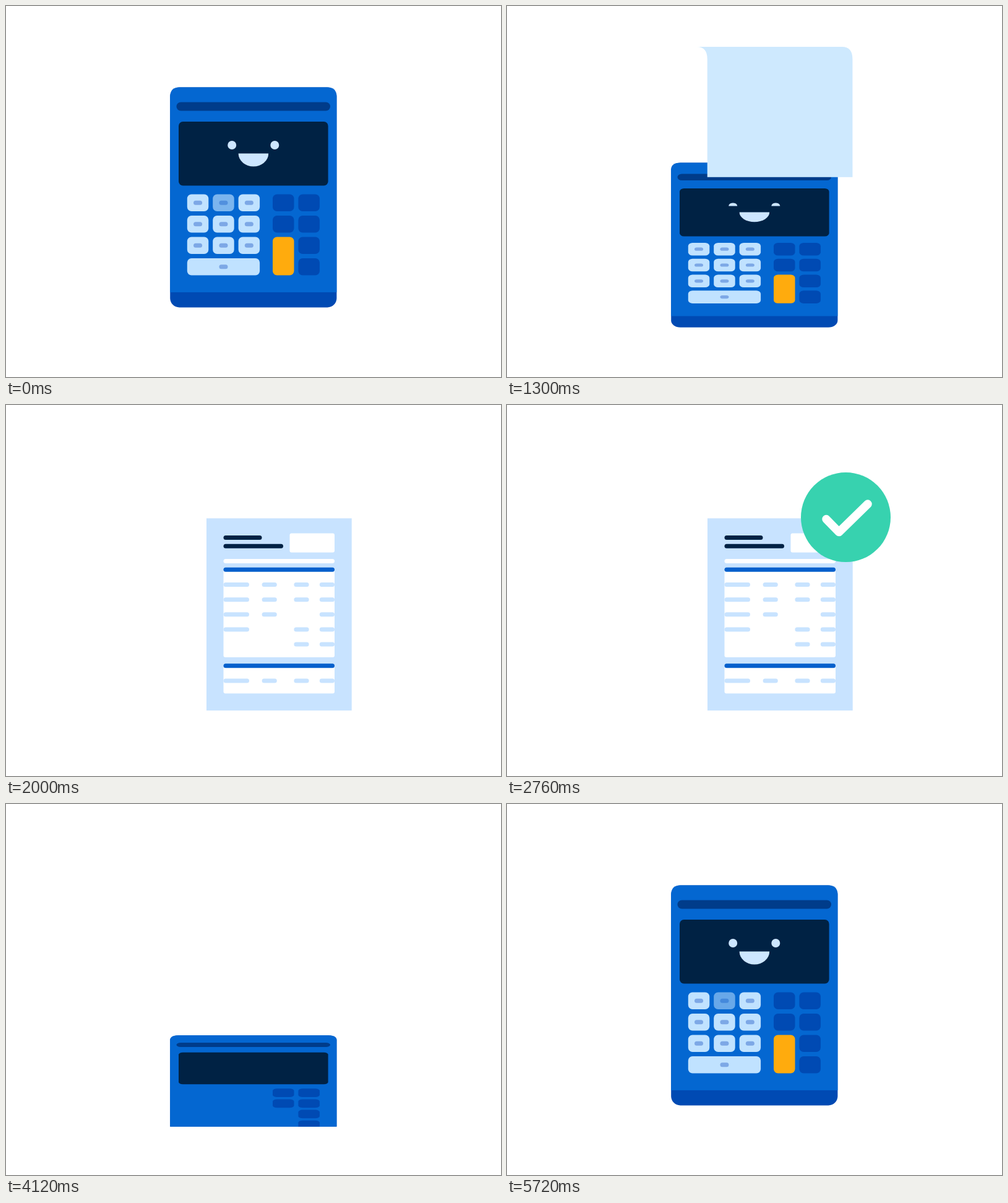
Recreate the animation shown at these times as an HTML page. Size 800 by 600 pixels, loop 5740 ms.

```html
<!DOCTYPE html>
<html lang="en">
<head>
<meta charset="utf-8">
<title>Calculator prints a sheet</title>
<style>
  html, body { margin: 0; width: 100%; height: 100%; overflow: hidden; background: #fff; }
  svg { display: block; }
</style>
</head>
<body>
<svg id="stage" width="800" height="600" viewBox="0 0 800 600"></svg>
<script>
const LOOP = 5740, FLOOR = 615;
const BODY = '#0467d1', DEEP = '#004ab3', NAVY = '#002244', PALE = '#c8e3ff', KEY = '#c0e2ff';

const rect = (x, y, w, h, r, fill) =>
  `<rect x="${x}" y="${y}" width="${w}" height="${h}" rx="${r}" fill="${fill}"/>`;
const dash = (x, y) => rect(x - 7, y - 3.5, 14, 7, 3.5, '#7da8e6');
const group = (cls, inner) => `<g class="${cls}">${inner}</g>`;

const columns = [292.8, 334.2, 375.6], rows = [304.5, 339, 373.5, 408];
const pops = [];   // centre of every key that pops in

function lightKeys() {
  let out = '';
  for (let i = 0; i < 10; i++) {
    const wide = i === 9, x = wide ? columns[0] : columns[i % 3], y = rows[wide ? 3 : Math.floor(i / 3)];
    const w = wide ? 117.3 : 34.5;
    pops.push([x + w / 2, y + 13.8]);
    out += group('key', rect(x, y, w, 27.6, 7, KEY) + dash(x + w / 2, y + 13.8));
  }
  pops.push([448.2, 404.5]);
  return out + group('key', rect(431, 373.5, 34.5, 62, 7, '#ffab0d'));
}

function calculator() {
  let out = rect(265.2, 131.5, 269.2, 356, 15, DEEP)
    + `<path d="M265.2 463V146.5q0-15 15-15H519.4q15 0 15 15V463z" fill="${BODY}"/>`
    + rect(275.5, 155.5, 248.5, 14, 7, '#003c8a')
    + rect(279, 187, 241.6, 103.5, 7, NAVY);
  rows.forEach((y, i) => {
    if (i < 2) out += rect(431, y, 34.5, 27.6, 7, DEEP);
    out += rect(472.4, y, 34.5, 27.6, 7, DEEP);
  });
  return out + group('face',
    `<g clip-path="url(#lids)" fill="#cde6ff"><circle cx="365.2" cy="225" r="7"/><circle cx="434.3" cy="225" r="7"/></g>
     <path d="M375.6 238.5h48.6a24.3 21 0 0 1-48.6 0z" fill="#cde6ff"/>`) + lightKeys();
}

function sheet() {
  const cells = [[351.5, 41.5], [413.6, 24.2], [465.4, 24.2], [506.8, 24.2]];
  const line = (y, mask) => cells.map(([x, w], i) => mask[i] === '1' ? rect(x, y, w, 7, 3.5, PALE) : '').join('');
  const bar = (y, w, fill) => rect(351.5, y, w, 7, 3.5, fill);
  return rect(324, 183.3, 234.7, 310.8, 0, PALE)
    + bar(211, 62, NAVY) + bar(224.8, 96.5, NAVY)
    + rect(458.5, 207.5, 72.5, 31, 3, '#fff') + bar(249, 179.5, '#fff')
    + rect(351.5, 266, 179.5, 142, 3, '#fff') + bar(262.8, 179.5, '#0560cc')
    + ['1111', '1111', '1101', '1011', '0011'].map((m, i) => line(287 + i * 24.15, m)).join('')
    + rect(351.5, 422, 179.5, 44.5, 3, '#fff') + bar(418.3, 179.5, '#0560cc') + line(442.4, '1111');
}

const stage = document.getElementById('stage');
stage.innerHTML = `
  <clipPath id="floor"><rect width="800" height="521.8"/></clipPath>
  <clipPath id="lids"><rect id="lid" x="350" y="218" width="100" height="14"/></clipPath>
  <g clip-path="url(#floor)">
    <g id="calc">${calculator()}</g>
    <path id="paper"/>
    <g id="sheet">${sheet()}</g>
  </g>
  <g id="check"><circle r="72.5" fill="#37d2af"/>
    <path d="M-31.5 3L-11 24L35.5-21.5" fill="none" stroke="#fff" stroke-width="13.5"
      stroke-linecap="round" stroke-linejoin="round" pathLength="100" stroke-dasharray="100 200"/></g>`;

const find = s => stage.querySelector(s);
const [calc, paper, doc, check, lid, face] = ['#calc', '#paper', '#sheet', '#check', '#lid', '.face'].map(find);
const tick = find('#check path'), keys = [...stage.querySelectorAll('.key')];

const mix = (a, b, p) => a + (b - a) * p;
const span = (t, a, b) => Math.min(1, Math.max(0, (t - a) / (b - a)));
const easeIn = p => p * p;
const easeOut = p => 1 - (1 - p) ** 2;
const easeInOut = p => p < .5 ? 4 * p ** 3 : 1 - 4 * (1 - p) ** 3;
const show = (el, on) => el.setAttribute('display', on ? 'inline' : 'none');
const set = (el, name, value) => el.setAttribute(name, value);
const squash = (pivot, s) => `translate(0 ${pivot * (1 - s)}) scale(1 ${s})`;
const popAt = (x, y, s) => `translate(${x} ${y}) scale(${s}) translate(${-x} ${-y})`;

const presses = [4, 9, 1, 6, 8].map((key, i) => ({ key, at: 5294 + i * 200 }));

function drawCalculator(t) {
  const leaving = t < 3000;
  const s = leaving ? mix(1, .19, easeIn(span(t, 1100, 1460))) : mix(.19, 1, easeOut(span(t, 4040, 4420)));
  show(calc, t < 1460 || t > 4040);
  set(calc, 'transform', squash(FLOOR, s));
  set(lid, 'height', leaving ? mix(14, 7, span(t, 400, 490)) : 14);
  set(face, 'opacity', leaving ? 1 : span(t, 4440, 4600));

  const wrapped = t < 600 ? t + LOOP : t;
  keys.forEach((el, i) => {
    const start = 4440 + i * 46;
    set(el, 'transform', popAt(...pops[i], leaving ? 1 : easeOut(span(t, start, start + 180))));
    let dip = 0;
    for (const p of presses) if (p.key === i) dip = Math.max(dip, 1 - Math.abs(wrapped - p.at) / 120);
    set(el, 'opacity', 1 - .6 * dip);
  });
  return s;
}

function drawPaper(t, slotScale) {
  const settle = easeInOut(span(t, 1468, 1920));
  show(paper, t >= 780 && t < 1920);
  const left = mix(282.5, 324, easeInOut(span(t, 1080, 1330))), right = left + 234.7;
  const top = mix(66, 183.3, settle);
  const slot = FLOOR - (FLOOR - 162.5) * slotScale;
  const bottom = t < 1460 ? Math.min(421, slot) : mix(421, 494.1, settle);
  const curl = t < 1640 ? 18 * Math.cos(Math.PI * (t - 780) / 580) : 0;
  const bend = top + 20;
  set(paper, 'd', `M${left} ${bottom}V${bend}Q${left} ${top} ${left + curl} ${top}H${right + curl}`
    + `Q${right} ${top} ${right} ${bend}V${bottom}z`);
  const tint = span(t, 780, 1400);
  set(paper, 'fill', `rgb(${mix(239, 200, tint)},${mix(248, 230, tint)},${mix(250, 255, tint)})`);

  show(doc, t > 1440 && t < 4040);
  set(doc, 'opacity', span(t, 1440, 1580));
  const s = mix(.758, 1, settle);
  set(doc, 'transform', t < 3000
    ? `translate(0 ${mix(114.7, 183.3, settle) - 183.3 * s}) scale(1 ${s})`
    : squash(FLOOR, mix(1, .19, easeIn(span(t, 3820, 4040)))));
}

function drawCheck(t) {
  const enter = easeOut(span(t, 2460, 2700)), leave = span(t, 3420, 3645);
  show(check, t > 2460 && t < 3645);
  set(check, 'opacity', span(t, 2460, 2640) * (1 - leave));
  set(check, 'transform', `translate(${547.5 - 4.4 * leave} 181.6) scale(${mix(.6, 1, enter) * (1 - .224 * leave)})`);
  set(tick, 'stroke-dashoffset', 100 * (1 - span(t, 2520, 2760)));
}

function frame() {
  const t = performance.now() % LOOP;
  drawPaper(t, drawCalculator(t));
  drawCheck(t);
  requestAnimationFrame(frame);
}
frame();
</script>
</body>
</html>
```
